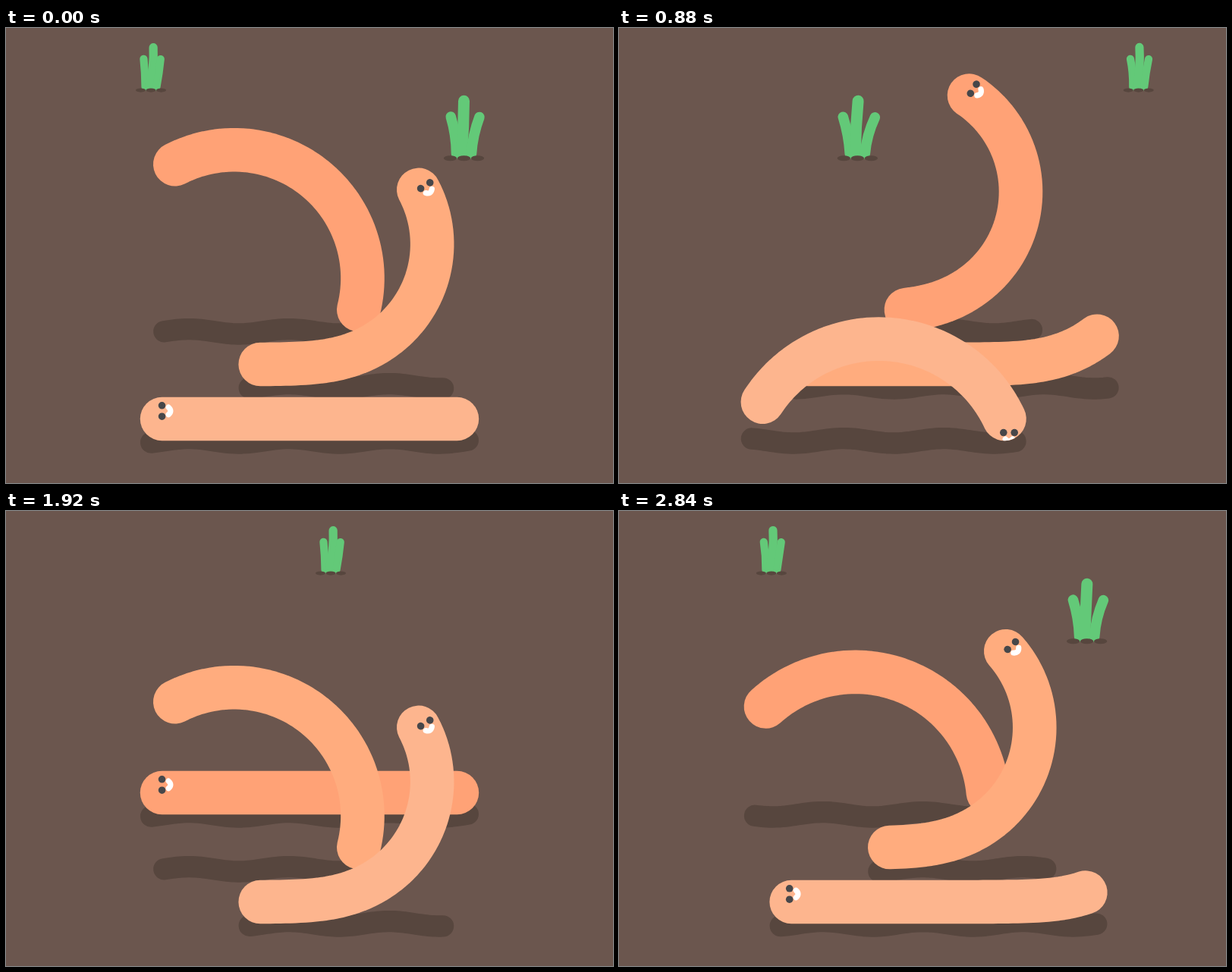
Write an HTML page with a canvas that moves like this. It is 800 by 600 pixels and loops after 2.88 s.

```html
<!DOCTYPE html>
<html lang="en">
<head>
<meta charset="utf-8">
<title>Tumbling worms</title>
<style>
  html, body { margin: 0; width: 100%; height: 100%; overflow: hidden; background: #6b564e; }
  canvas { display: block; }
</style>
</head>
<body>
<canvas id="stage" width="800" height="600"></canvas>
<script>
const ctx = document.getElementById('stage').getContext('2d');
const TAU = Math.PI * 2, RAD = Math.PI / 180;
const FRAME_MS = 40, LOOP = 72, FLIP = 18;
const GROUND = '#6b564e', SHADE = '#57463e', GREEN = '#63c978', INK = '#47474a';
const RADIUS = 28.8, LENGTH = 388.8, STEP = LENGTH / FLIP;

const WORMS = [
  { y: 371.5, color: '#ffa276', start: 12 },
  { y: 443.5, color: '#ffac7e', start: 24 },
  { y: 515.5, color: '#fdb58e', start: 0 }
];
const PLANTS = [
  { x: 191, y: 82, scale: 0.75, span: 711, lead: 4.8 },
  { x: 603.5, y: 171.7, scale: 1, span: 946.5, lead: 0 }
];
const STEMS = [
  { side: -1, base: -10, tip: -16, height: 55, sway: 4, width: 13.6 },
  { side: 0, base: -3, tip: 6, height: 75.5, sway: 6, width: 15 },
  { side: 1, base: 10, tip: 22, height: 55, sway: 5, width: 13.6 }
];
// Frame of the flip and the heading, in degrees, of the middle of the body.
const MIDDLE = [[4, 176], [9, 90], [10.5, 65], [12, 45], [18, -76]];

const mod = (a, n) => ((a % n) + n) % n;
const softRamp = (v, softness) => softness * Math.log(1 + Math.exp(v / softness));

function interpolate(keys, at) {
  const i = Math.max(1, keys.findIndex(key => key[0] >= at));
  const [[x0, y0], [x1, y1]] = [keys[i - 1], keys[i]];
  return y0 + (y1 - y0) * (at - x0) / (x1 - x0);
}

// Heading in degrees at s, from foot (0) to tip (1): first an inchworm arch,
// then an evenly curved body that unrolls until it lies flat.
function heading(s, frame) {
  if (frame <= 3) return 180 + (frame / 3) ** 0.7 * (25 - 167 * (s - 0.78) ** 2);
  const curl = 146 - 4.8 * Math.max(0, 9 - frame);
  return softRamp(interpolate(MIDDLE, frame) + curl * (s - 0.5), 9);
}

function spine(frame, y) {
  const parts = 60, step = LENGTH / parts;
  let x = 400 + (9 - frame) * STEP;
  const points = [[x, y]];
  for (let i = 0; i < parts; i++) {
    const angle = heading((i + 0.5) / parts, frame) * RAD;
    x += step * Math.cos(angle);
    y -= step * Math.sin(angle);
    points.push([x, y]);
  }
  return points;
}

function strokeLine(points, width, color) {
  ctx.beginPath();
  points.forEach(([x, y]) => ctx.lineTo(x, y));
  ctx.lineWidth = width;
  ctx.strokeStyle = color;
  ctx.stroke();
}

function strokeCurve(x0, y0, cx, cy, x1, y1, width, color) {
  ctx.beginPath();
  ctx.moveTo(x0, y0);
  ctx.quadraticCurveTo(cx, cy, x1, y1);
  ctx.lineWidth = width;
  ctx.strokeStyle = color;
  ctx.stroke();
}

function disc(x, y, rx, ry, color) {
  ctx.beginPath();
  ctx.ellipse(x, y, rx, ry, 0, 0, TAU);
  ctx.fillStyle = color;
  ctx.fill();
}

function drawShadow(points, y, frame) {
  const xs = points.map(p => p[0]);
  const left = Math.min(...xs) - 14.4, right = Math.max(...xs) + 14.4;
  const wave = [];
  for (let i = 0; i <= 80; i++) {
    const x = left + (right - left) * i / 80;
    wave.push([x, y + RADIUS - 3.2 * Math.cos(TAU * ((x - 109) / 132 + frame * 5 / 24))]);
  }
  strokeLine(wave, 28.4, SHADE);
}

// The face rides the tip for one flip, slides off the foot, then slides back on.
function drawFace(points, cycle) {
  const riding = cycle < FLIP, leaving = !riding && cycle < 27;
  const [x, y] = riding ? points[points.length - 1] : points[0];
  let tilt = -90, slide = -2.5 * (2 * FLIP - cycle) ** 2;
  if (riding) {
    tilt = -softRamp(heading(1, cycle) - 90, 20);
    slide = 0;
  } else if (leaving) {
    tilt = 0;
    slide = 26 * ((cycle - 17) / 6) ** 2;
  }
  ctx.save();
  ctx.beginPath();
  ctx.arc(x, y, RADIUS, 0, TAU);
  ctx.clip();
  ctx.translate(x, y);
  ctx.rotate(tilt * RAD);
  ctx.translate(10.5 - (leaving ? slide / 4 : 0), slide);
  disc(-7.2, 0, 4.8, 4.8, INK);
  disc(7.2, 0, 4.8, 4.8, INK);
  strokeCurve(-4.8, 8.6, 0, 14, 4.8, 8.6, 7.2, '#fff');
  ctx.restore();
}

function drawPlant({ y, scale, lead }, x, frame) {
  ctx.save();
  ctx.translate(x, y);
  ctx.scale(scale, scale);
  for (const { side, base, tip, height, sway, width } of STEMS) {
    // The middle of a stem bends ahead of its tip.
    const swing = ahead => sway * Math.cos(TAU * (frame - 12 - 4.8 * side + lead + ahead) / 24);
    const tipX = tip + swing(0);
    const middleX = (base + tip) / 2 + 0.9 * swing(4.8);
    strokeCurve(base, -6, middleX, -height / 2 - 3,
      tipX, -height + (tipX - base) ** 2 / 140, width, GREEN);
  }
  for (const spot of [-18, 0, 18]) disc(spot, 0, 8.7, 3.5, SHADE);
  ctx.restore();
}

function draw(frame) {
  ctx.fillStyle = GROUND;
  ctx.fillRect(0, 0, 800, 600);
  ctx.lineCap = ctx.lineJoin = 'round';
  for (const plant of PLANTS) {
    const x = mod(plant.x - plant.span * frame / LOOP, plant.span);
    for (const turn of [-1, 0, 1]) drawPlant(plant, x + turn * plant.span, frame);
  }
  for (const { y, color, start } of WORMS) {
    const cycle = mod(frame - start, 2 * FLIP);
    const points = spine(cycle % FLIP, y);
    drawShadow(points, y, frame);
    strokeLine(points, 2 * RADIUS, color);
    drawFace(points, cycle);
  }
}

function tick() {
  // A quarter frame of slack keeps a repaint just before a step on the right pose.
  draw(Math.floor(performance.now() / FRAME_MS + 0.25) % LOOP);
  requestAnimationFrame(tick);
}
tick();
</script>
</body>
</html>
```
